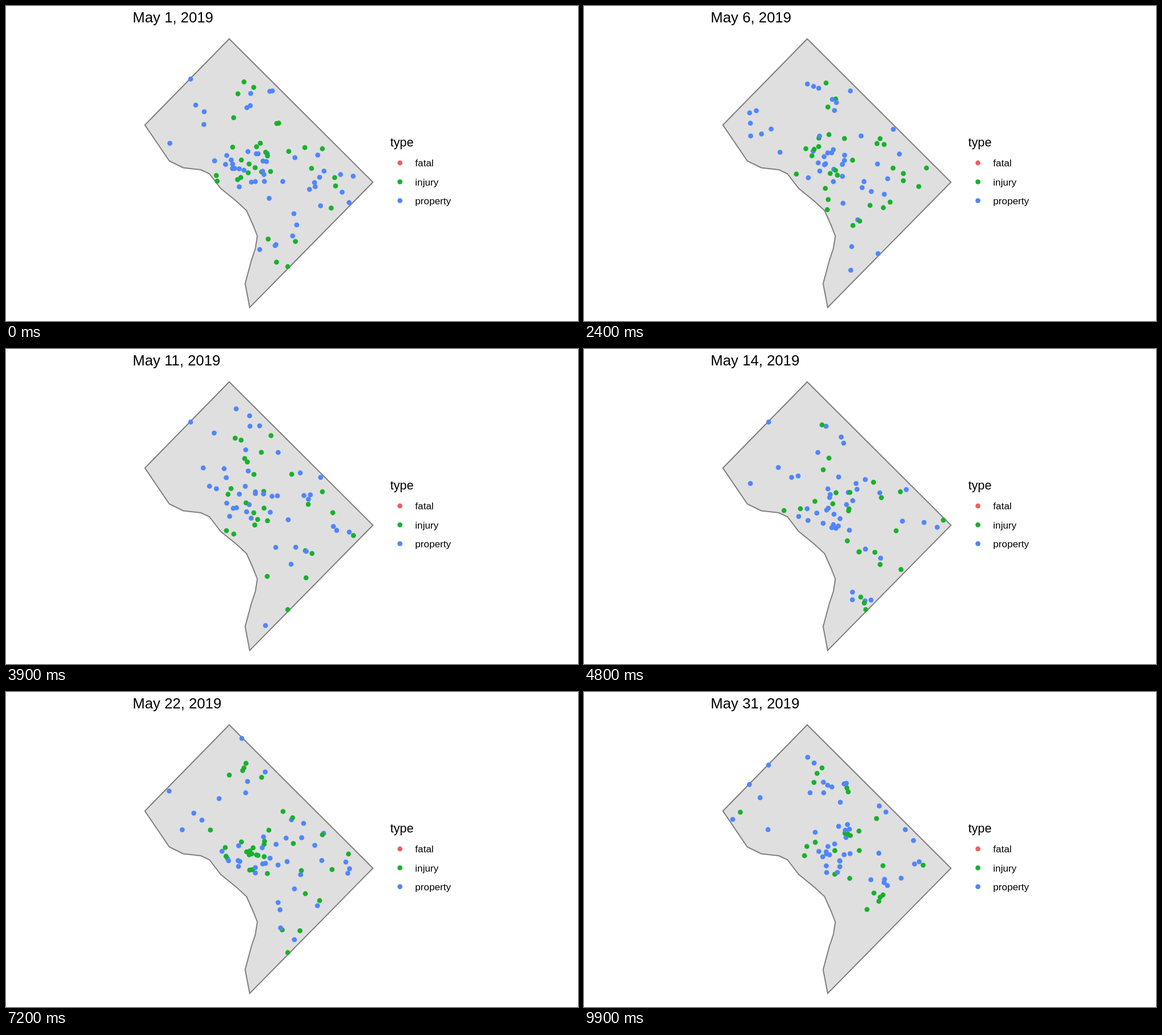
Write an HTML page that moves like this. It is 1007 px wide and 556 px high and loops after 10 s.

```html
<!DOCTYPE html>
<html lang="en">
<head>
<meta charset="utf-8">
<style>
html, body { margin: 0; width: 100%; height: 100%; overflow: hidden; background: #fff; }
svg { display: block; width: 1007px; height: 556px; font-family: "Liberation Sans", Arial, sans-serif; }
</style>
</head>
<body>
<svg id="stage" viewBox="0 0 1007 556">
  <text id="title" x="223" y="29" font-size="25.8"></text>
  <polygon points="393,58 646,311 429,532 421,490 432,449 439,428 442.5,406 435,387 423.5,361 405,344 378,322 358,296 343,289 312,285.5 287.5,273.5 244.5,210"
    fill="#dfdfdf" stroke="#7f7f7f" stroke-width="2"/>
  <g id="dots"></g>
  <text x="676.5" y="248" font-size="21.7">type</text>
  <g id="legend" font-size="17.2"></g>
</svg>
<script>
const LOOP = 10000, STEP = 100, DAYS = 31;
const COLORS = { fatal: '#f35e5a', injury: '#17b12b', property: '#5086ff' };
const FATAL_DAY = 26, FATAL_SPOT = [397, 258];
const $ = id => document.getElementById(id);

// Busy areas: centre, spread, share
const AREAS = [
  [429, 284, 28, 27, .43], [432, 160, 26, 32, .13], [508, 245, 32, 22, .12],
  [516, 350, 25, 25, .1], [578, 305, 24, 18, .08], [490, 430, 25, 28, .08], [335, 225, 32, 38, .06]
];

// Crossings where crashes recur
const CROSSINGS = {
  injury: [[557, 252], [527, 356], [496, 460], [603, 286], [419, 134]],
  property: [[325, 129], [604, 347], [422, 178], [439, 310], [469, 150]]
};

function add(parent, tag, attrs, text = '') {
  const el = document.createElementNS('http://www.w3.org/2000/svg', tag);
  for (const k in attrs) el.setAttribute(k, attrs[k]);
  el.textContent = text;
  parent.append(el);
  return el;
}

const dot = (parent, [x, y], type) =>
  add(parent, 'circle', { cx: x, cy: y, r: 4.4, fill: COLORS[type] });

function random(seed) {
  let a = seed * 7919;
  return () => {
    a = a + 0x6d2b79f5 | 0;
    let v = Math.imul(a ^ a >>> 15, 1 | a);
    v = v + Math.imul(v ^ v >>> 7, 61 | v) ^ v;
    return ((v ^ v >>> 14) >>> 0) / 4294967296;
  };
}

const corners = document.querySelector('polygon').getAttribute('points')
  .split(' ').map(p => p.split(',').map(Number));

function inside([x, y]) {
  let hit = false;
  corners.forEach(([ax, ay], i) => {
    const [bx, by] = corners[(i + 1) % corners.length];
    if (ay > y !== by > y && x < (bx - ax) * (y - ay) / (by - ay) + ax) hit = !hit;
  });
  return hit;
}

// Normal scatter around a random busy area, kept within the border
function place(rnd) {
  for (;;) {
    let pick = rnd(), i = 0;
    while (i < AREAS.length - 1 && pick > AREAS[i][4]) pick -= AREAS[i++][4];
    const [cx, cy, sx, sy] = AREAS[i];
    const r = Math.sqrt(-2 * Math.log(1 - rnd())), a = 2 * Math.PI * rnd();
    const p = [cx + sx * r * Math.cos(a), cy + sy * r * Math.sin(a)];
    if (inside(p)) return p;
  }
}

function crashes(day) {
  const rnd = random(day), list = [];
  const put = (p, type) => list.push({ p, type, order: rnd() });
  const sizes = { injury: 22 + rnd() * 14, property: 40 + rnd() * 14 };
  for (const type in sizes) {
    const spots = CROSSINGS[type].filter(() => rnd() < .5);
    while (spots.length < sizes[type]) spots.push(place(rnd));
    spots.forEach(p => put(p, type));
  }
  if (day === FATAL_DAY) put(FATAL_SPOT, 'fatal');
  return list.sort((a, b) => a.order - b.order);
}

const groups = Array.from({ length: DAYS }, (_, i) => {
  const g = add($('dots'), 'g', { display: 'none' });
  crashes(i + 1).forEach(c => dot(g, c.p, c.type));
  return g;
});

Object.keys(COLORS).forEach((type, i) => {
  const y = 277 + i * 33.3;
  dot($('legend'), [693.5, y], type);
  add($('legend'), 'text', { x: 720.3, y: y + 6.4 }, type);
});

// Four steps a day at first, three from day 9 on
const dayAt = n => n < 32 ? Math.floor(n / 4) + 1 : 9 + Math.floor((n - 32) / 3);

let shown = 0;
function draw(ms) {
  const n = Math.floor(ms % LOOP / STEP), day = dayAt(n);
  if (day !== shown) {
    if (shown) groups[shown - 1].setAttribute('display', 'none');
    groups[day - 1].removeAttribute('display');
    shown = day;
  }
  // The heading follows the dots one step later
  const label = `May ${dayAt(Math.max(0, n - 1))}, 2019`;
  if ($('title').textContent !== label) $('title').textContent = label;
}

const start = performance.now();
function tick() {
  draw(performance.now() - start);
  requestAnimationFrame(tick);
}
tick();
</script>
</body>
</html>
```
